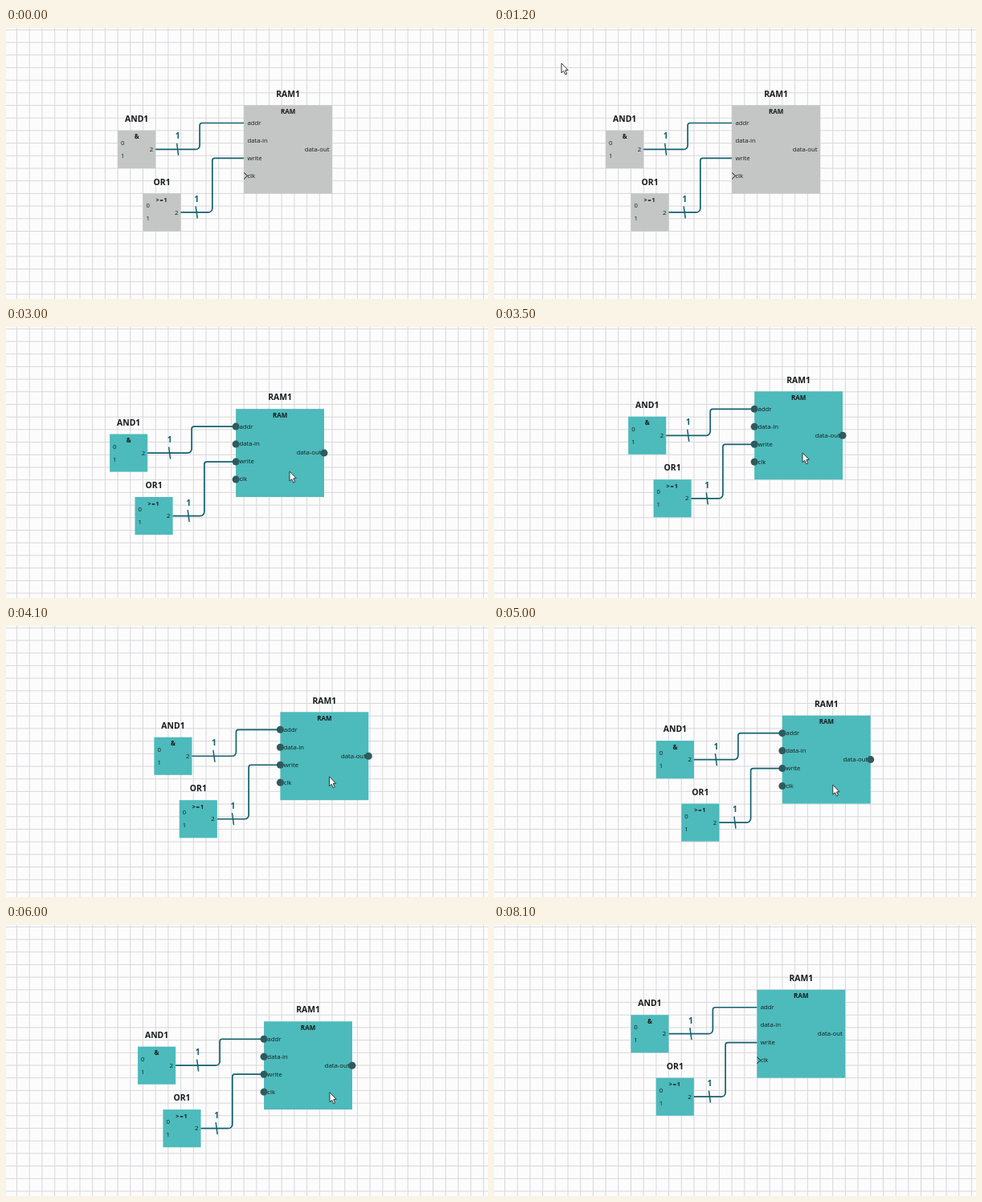
An HTML page with a canvas that plays this animation: 600x338 px, repeating every 8200 ms.

```html
<!DOCTYPE html>
<html lang="en">
<head>
<meta charset="utf-8">
<title>Moving a group of logic blocks</title>
<style>
  html, body { margin: 0; width: 100%; height: 100%; overflow: hidden; background: #fdfcfd; }
  canvas { display: block; }
</style>
</head>
<body>
<canvas id="stage" width="600" height="338"></canvas>
<script>
const ctx = document.getElementById('stage').getContext('2d');
const LOOP = 8200, STEP = 100;
const CELL = 15.7, LEFT = 139.1, TOP = 96.5;
const FONT = '"Open Sans", "Noto Sans", sans-serif';
const GRAY = '#c4c6c5', TEAL = '#4dbabb', WIRE = '#12626c', PORT = '#2f5a5e', INK = '#151b1c';
const SHOW = 600, PRESS = 1500, SELECTED = 2000, HOVER = 2200, GRAB = 2300, LEAVE = 6600;

// The pointer draws a selection box, then swings the group around a centre.
const approach = [
  [SHOW, 369, 317], [1200, 84, 44], [PRESS, 84, 44], [SELECTED, 459, 280], [GRAB, 370, 176]
];
const grip = [[2500, 370, 176], [3500, 356, 173], [5000, 359, 183], [6000, 378, 185]];
const swingCentre = [22, 5];
// [time, angle in degrees, radius]
const swing = [
  [GRAB, -193, 22.5], [2500, -72, 20], [2800, 80, 36], [3500, 434, 22], [4100, 706, 24],
  [4500, 706, 10], [5000, 706, 42], [5500, 1035, 52], [6000, 1359, 19], [6400, 1506, 22.7]
];

function at(keys, t) {
  const next = keys.findIndex(key => key[0] > t);
  if (next === 0) return keys[0].slice(1);
  if (next < 0) return keys[keys.length - 1].slice(1);
  const a = keys[next - 1], b = keys[next];
  const u = (t - a[0]) / (b[0] - a[0]);
  return [1, 2].map(n => a[n] + (b[n] - a[n]) * u);
}

function groupOffset(t) {
  if (t <= GRAB) return [0, 0];
  const [degrees, radius] = at(swing, t);
  const angle = degrees * Math.PI / 180;
  return [swingCentre[0] + radius * Math.cos(angle), swingCentre[1] - radius * Math.sin(angle)];
}

function stroke(points, color, width) {
  ctx.strokeStyle = color;
  ctx.lineWidth = width;
  ctx.beginPath();
  points.forEach(p => ctx.lineTo(...p));
  ctx.stroke();
}

function text(label, x, y, { size = 7.8, weight = 400, align = 'center', color = INK, spacing = 0 } = {}) {
  ctx.font = `${weight} ${size}px ${FONT}`;
  ctx.letterSpacing = `${spacing}px`;
  ctx.textAlign = align;
  ctx.fillStyle = color;
  ctx.fillText(label, x, y);
}

function drawGrid() {
  ctx.fillStyle = '#fdfcfd';
  ctx.fillRect(0, 0, 600, 338);
  ctx.fillStyle = '#d8d6d9';
  for (let x = LEFT % CELL; x < 600; x += CELL) ctx.fillRect(x - 0.5, 0, 1, 338);
  for (let y = TOP % CELL; y < 338; y += CELL) ctx.fillRect(0, y - 0.5, 600, 1);
}

function drawBlock(x, y, cells, name, symbol, fill, symbolStyle) {
  const size = cells * CELL, middle = x + size / 2;
  ctx.fillStyle = fill;
  ctx.fillRect(x, y, size, size);
  text(name, middle, y - 10.8, { size: 10.4, weight: 700 });
  text(symbol, middle, y + 10.5, { size: 8, weight: 700, ...symbolStyle });
}

// Column and row are counted in grid cells from the corner of the group.
function drawGate(column, row, name, symbol, fill, wireRow, symbolStyle) {
  const x = column * CELL, y = row * CELL;
  drawBlock(x, y, 3, name, symbol, fill, symbolStyle);
  text('0', x + 4, y + 18, { align: 'left' });
  text('1', x + 4, y + 34, { align: 'left' });
  text('2', x + 44, y + 26.2, { align: 'right' });
  drawWire(x + 3 * CELL, y + 1.5 * CELL, (column / 2 + 6.5) * CELL, wireRow * CELL);
}

function drawWire(x, y, bend, endY) {
  const end = 10 * CELL, mark = (x + bend) / 2;
  ctx.strokeStyle = WIRE;
  ctx.lineWidth = 1.7;
  ctx.beginPath();
  ctx.moveTo(x, y);
  ctx.arcTo(bend, y, bend, endY, 5);
  ctx.arcTo(bend, endY, end, endY, 3);
  ctx.lineTo(end, endY);
  ctx.stroke();
  stroke([[mark - 1, y - 7.5], [mark + 1, y + 7.5]], WIRE, 1.5);
  text('1', mark, y - 13, { size: 10.4, weight: 700, color: WIRE });
}

function drawPort(x, y) {
  ctx.fillStyle = PORT;
  ctx.beginPath();
  ctx.arc(x, y, 4.5, 0, 2 * Math.PI);
  ctx.fill();
}

function drawMemory(x, fill, showPorts) {
  drawBlock(x, 0, 7, 'RAM1', 'RAM', fill);
  ['addr', 'data-in', 'write', 'clk'].forEach((label, i) => {
    const y = (i + 1) * 1.4 * CELL;
    if (showPorts) drawPort(x, y);
    else if (label === 'clk') stroke([[x, y - 4], [x + 4.5, y], [x, y + 4]], INK, 1);
    text(label, x + 4.3, y + 2.4, { align: 'left' });
  });
  const middle = 3.5 * CELL;
  if (showPorts) drawPort(x + 7 * CELL, middle);
  text('data-out', x + 106.5, middle + 2.4, { align: 'right' });
}

function drawSelection([x, y]) {
  const box = [84.5, 44.5, x - 84, y - 44];
  ctx.fillStyle = 'rgba(77, 186, 187, 0.1)';
  ctx.fillRect(...box);
  ctx.strokeStyle = WIRE;
  ctx.lineWidth = 1;
  ctx.strokeRect(...box);
}

function drawPointer(x, y) {
  const outline = [[0, 0], [0, 12], [2.7, 9.5], [4.7, 14], [6.7, 13.1], [4.8, 8.8], [8.2, 8.5]];
  ctx.save();
  ctx.translate(x, y);
  ctx.beginPath();
  outline.forEach(p => ctx.lineTo(...p));
  ctx.closePath();
  ctx.fillStyle = '#fff';
  ctx.fill();
  ctx.strokeStyle = '#333';
  ctx.lineWidth = 1;
  ctx.stroke();
  ctx.restore();
}

function render(t) {
  const [dx, dy] = groupOffset(t);
  const [gripX, gripY] = at(grip, t);
  const pointer = t < GRAB ? at(approach, t) : [gripX + dx, gripY + dy];
  const fill = t < SELECTED ? GRAY : TEAL;

  drawGrid();
  ctx.save();
  ctx.translate(LEFT + dx, TOP + dy);
  drawMemory(10 * CELL, fill, t >= HOVER && t < LEAVE);
  drawGate(0, 2, 'AND1', '&', fill, 1.4);
  drawGate(2, 7, 'OR1', '>=1', fill, 4.2, { size: 7.2, spacing: 1 });
  ctx.restore();

  if (t > PRESS && t < SELECTED) drawSelection(pointer);
  if (t >= SHOW && t < LEAVE) drawPointer(...pointer);
}

const start = performance.now();
function tick() {
  const t = (performance.now() - start) % LOOP;
  render(Math.floor(t / STEP) * STEP);
  requestAnimationFrame(tick);
}
tick();
</script>
</body>
</html>
```
